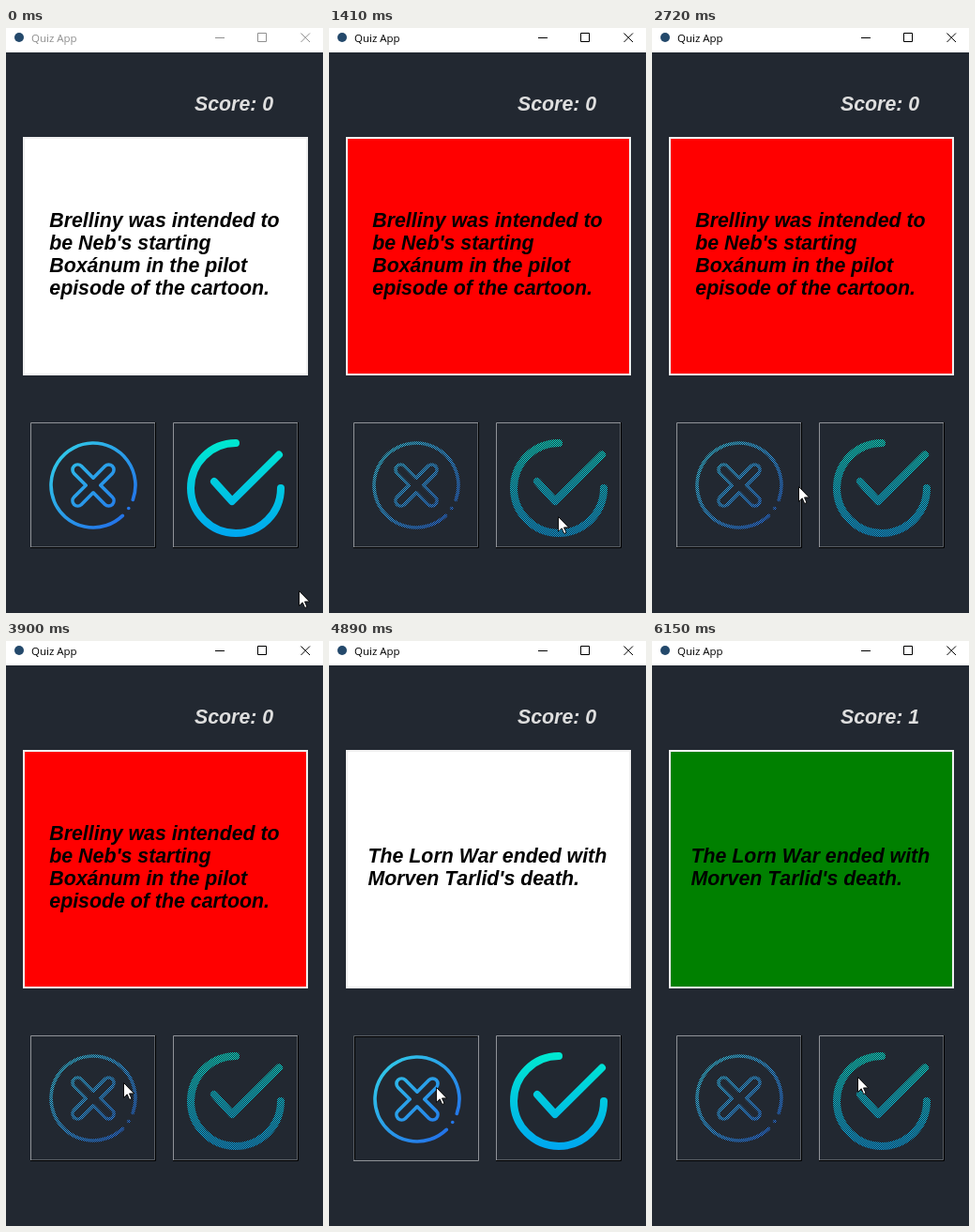
Animation of 338 by 623 pixels, one loop 8 s. Source, as an HTML page:

```html
<!DOCTYPE html>
<html lang="en">
<head>
<meta charset="utf-8">
<title>Quiz App</title>
<style>
  html, body { margin: 0; width: 100%; height: 100%; overflow: hidden; background: #222831; }
  svg { display: block; width: 338px; height: 623px; }
  .title { font: 11.5px "Open Sans", sans-serif; }
  .big { font: italic bold 21.33px "Liberation Sans", Arial, sans-serif; font-kerning: none; }
  .icon { fill: none; stroke-linecap: round; stroke-linejoin: round; }
</style>
</head>
<body>
<svg viewBox="0 0 338 623">
  <defs>
    <linearGradient id="blue" gradientUnits="userSpaceOnUse" x1="-33" y1="-33" x2="33" y2="33">
      <stop offset="0" stop-color="#30c4e8"/><stop offset="1" stop-color="#2374ea"/>
    </linearGradient>
    <linearGradient id="teal" gradientUnits="userSpaceOnUse" x1="0" y1="-52" x2="0" y2="52">
      <stop offset="0" stop-color="#00ead0"/><stop offset="1" stop-color="#00a6f0"/>
    </linearGradient>
    <pattern id="stipple" width="2" height="2" patternUnits="userSpaceOnUse">
      <path d="M0 0h1v1h-1zM1 1h1v1h-1z" fill="#222831" shape-rendering="crispEdges"/>
    </pattern>
  </defs>

  <rect width="338" height="623" fill="#222831"/>
  <rect width="338" height="26" fill="#fff"/>
  <circle cx="14" cy="10" r="5" fill="#24496b"/>
  <text id="title" class="title" x="27" y="15">Quiz App</text>
  <path id="controls" fill="none" d="M223 10.5h10M268.5 5.5h9v9h-9zM314.5 5.5l9.5 9.5M324 5.5l-9.5 9.5"/>

  <text id="score" class="big" x="201" y="88" fill="#dedede"></text>
  <rect x="18" y="116" width="304" height="254" fill="#f0f0f0"/>
  <rect id="card" x="20" y="118" width="300" height="250"/>
  <g id="question" class="big"></g>

  <g id="cross" class="icon" stroke="url(#blue)" stroke-width="3.6"></g>
  <g id="check" class="icon" stroke="url(#teal)" stroke-width="8"></g>
  <path id="veil" d="M28 422h130v130h-130zM180 422h130v130h-130z" fill="url(#stipple)"/>
  <g id="crossBox" fill="none"></g>
  <g id="checkBox" fill="none"></g>

  <path id="cursor" d="M.5 .5V16.3L4.2 12.8L6.7 18.5L9 17.5L6.5 11.9H11.6Z" fill="#fff" stroke="#000" stroke-width=".9"/>
</svg>
<script>
const $ = id => document.getElementById(id);
const LOOP = 8000, TICK = 77.8;

// Ticks at which the scene changes
const PRESS_CHECK = 3, WRONG = 4, NEXT = 55, PRESS_CROSS = 63, RIGHT = 64;

const first = { x: 46.3, y: 212, lines: ["Brelliny was intended to", "be Neb's starting",
  "Boxánum in the pilot", "episode of the cartoon."] };
const second = { x: 41.5, y: 236, lines: ["The Lorn War ended with", "Morven Tarlid's death."] };

// Pointer path: tick, x, y
const path = [
  [0, 312, 599], [4, 258, 499], [11, 264, 564], [13, 264, 564], [18, 244, 520],
  [23, 240, 514], [25, 240, 514], [35, 156, 488], [43, 156, 488], [45, 160, 481],
  [47, 160, 481], [51, 119, 468], [55, 119, 468], [57, 114, 475], [64, 114, 475],
  [68, 115, 518], [71, 115, 518], [79, 219, 464]
];

const polar = (r, deg) => {
  const a = deg * Math.PI / 180;
  return [r * Math.cos(a), r * Math.sin(a)].map(v => v.toFixed(2)).join(" ");
};

function crossShape() {
  const r = 45, w = 5.5, n = 7.8, a = 12.6, b = 20.4;
  const cap = `A${w} ${w} 0 0 1 `;
  return `<path d="M${polar(r, 20)}A${r} ${r} 0 1 0 ${polar(r, 46)}"/>
    <path d="M${polar(r, 33)}h.01"/>
    <path d="M0 ${-n}L${a} ${-b}${cap}${b} ${-a}L${n} 0L${b} ${a}${cap}${a} ${b}
      L0 ${n}L${-a} ${b}${cap}${-b} ${a}L${-n} 0L${-b} ${-a}${cap}${-a} ${-b}Z"/>`;
}
$("cross").innerHTML = crossShape();
$("check").innerHTML = `<path d="M0 -48A48 48 0 1 0 48 0"/><path d="M-23 -7L-4 14L46 -35.5"/>`;

// Two-pixel bevel of a button 134 px wide
function bevel(x, y, pressed) {
  const light = "#909398", dark = "#595e64", black = "#000";
  const line = (d, c) => `<path d="${d}" stroke="${c}"/>`;
  const topLeft = i => `M${x + i + .5} ${y + 133 - i}V${y + i + .5}H${x + 133 - i}`;
  const bottomRight = i => `M${x + i} ${y + 133.5 - i}H${x + 133.5 - i}V${y + i}`;
  return pressed
    ? line(topLeft(0), dark) + line(topLeft(1), black) + line(bottomRight(0), light)
    : line(topLeft(0), light) + line(bottomRight(1), dark) + line(bottomRight(0), black);
}

function pointer(k) {
  let i = 0;
  while (i < path.length - 1 && path[i + 1][0] <= k) i++;
  const a = path[i], b = path[i + 1] || a;
  const p = b === a ? 0 : (k - a[0]) / (b[0] - a[0]);
  const e = p * p * (3 - 2 * p);
  return [1, 2].map(j => Math.round(a[j] + (b[j] - a[j]) * e));
}

function place(id, x, y, pressed) {
  const d = pressed ? 1 : 0;
  $(id).setAttribute("transform", `translate(${x + d} ${y + d})`);
}

function draw(t) {
  const k = Math.floor((t + 16) / TICK);
  const active = k >= PRESS_CHECK;
  const wrong = k >= WRONG && k < NEXT, right = k >= RIGHT;
  const checkDown = k === PRESS_CHECK, crossDown = k === PRESS_CROSS;

  $("title").setAttribute("fill", active ? "#000" : "#8f8f8f");
  $("controls").setAttribute("stroke", active ? "#000" : "#909090");
  $("score").textContent = "Score: " + (right ? 1 : 0);
  $("card").setAttribute("fill", wrong ? "#ff0000" : right ? "#008000" : "#fff");

  const q = k < NEXT ? first : second;
  $("question").innerHTML = q.lines
    .map((s, i) => `<text x="${q.x}" y="${q.y + i * 24}">${s}</text>`).join("");

  $("crossBox").innerHTML = bevel(26, 420, crossDown);
  $("checkBox").innerHTML = bevel(178, 420, checkDown);
  place("cross", 93, 487, crossDown);
  place("check", 245, 490, checkDown);
  $("veil").setAttribute("visibility", wrong || right ? "visible" : "hidden");

  $("cursor").setAttribute("transform", `translate(${pointer(k).join(" ")})`);
}

let start;
function loop(now) {
  if (start === undefined) start = now;
  draw((now - start) % LOOP);
  requestAnimationFrame(loop);
}
draw(0);
requestAnimationFrame(loop);
</script>
</body>
</html>
```
